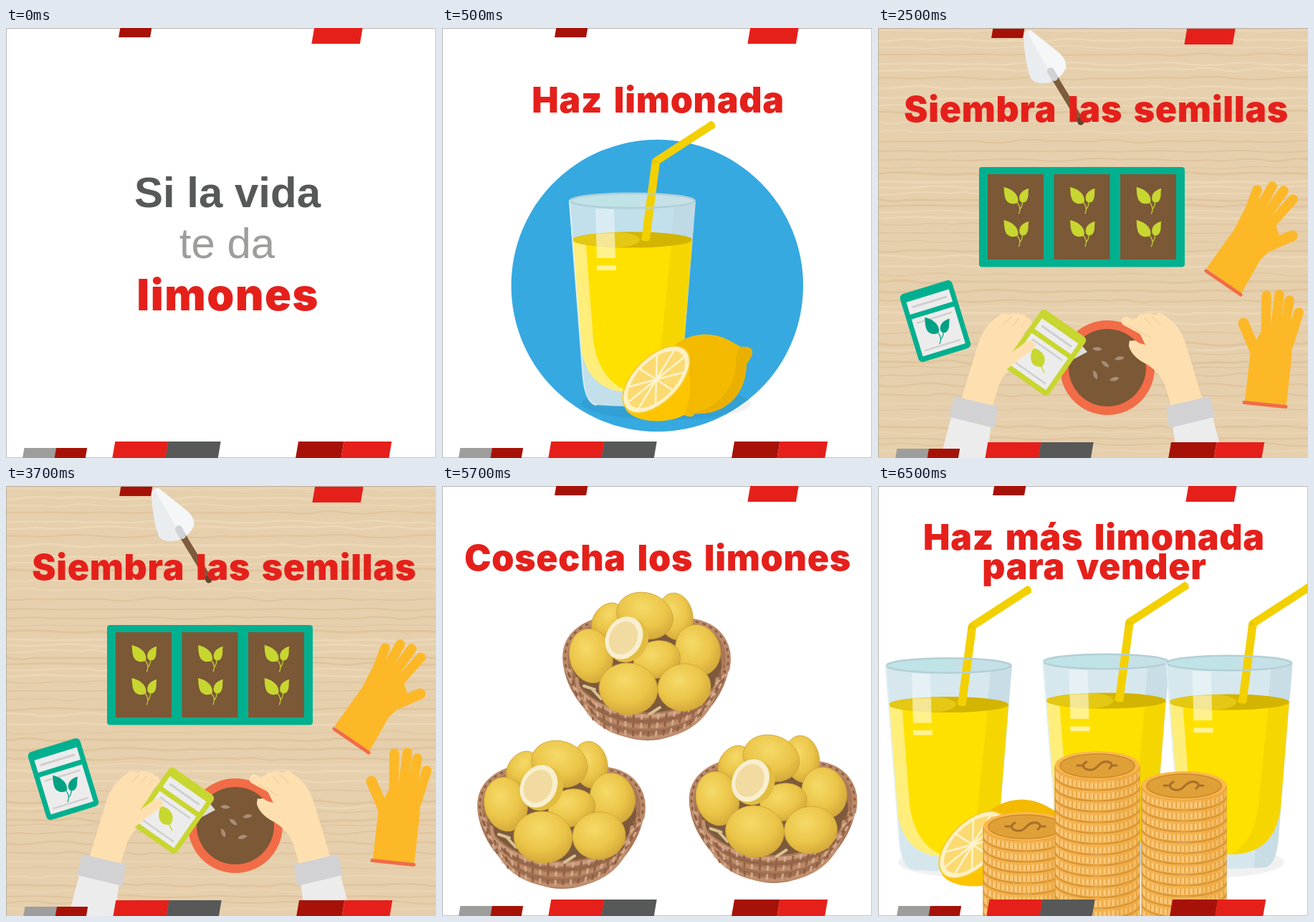
These frames come from a looping animation (600x600 px, 8 s). An HTML page:

```html
<!DOCTYPE html>
<html lang="es">
<head>
<meta charset="utf-8">
<title>Limonada</title>
<style>
html, body { margin: 0; width: 100%; height: 100%; overflow: hidden; background: #fff; }
svg { display: block; width: 100vw; height: 100vh; }
.head { font: 900 50px Inter, "Liberation Sans", sans-serif; letter-spacing: .7px; word-spacing: 5px; fill: #e5201b; text-anchor: middle; }
.intro { font: 60px "Liberation Sans", Arial, sans-serif; text-anchor: middle; }
</style>
</head>
<body>
<svg id="stage" viewBox="0 0 600 600"></svg>
<script>
const RED = '#e5201b', DARK = '#a61208', GREY = '#9d9d9c', SLATE = '#575858';
const SOIL = '#7b5836', LIME = '#c8d630', TEAL = '#00b08f', ORANGE = '#f16c47', SKIN = '#fee0b0', GLOVE = '#fcb827';

const shape = (d, fill, more = '') => `<path d="${d}" fill="${fill}" ${more}/>`;
const line = (d, stroke, w, more = '') =>
  `<path d="${d}" fill="none" stroke="${stroke}" stroke-width="${w}" stroke-linecap="round" stroke-linejoin="round" ${more}/>`;
const oval = (x, y, rx, ry, fill, rot = 0, more = '') =>
  `<ellipse cx="${x}" cy="${y}" rx="${rx}" ry="${ry}" fill="${fill}" transform="rotate(${rot} ${x} ${y})" ${more}/>`;
const box = (x, y, w, h, fill, more = '') =>
  `<rect x="${x}" y="${y}" width="${w}" height="${h}" fill="${fill}" ${more}/>`;
const at = (x, y, s) => `<g transform="translate(${x} ${y})">${s}</g>`;
const turn = (x, y, a, s) => `<g transform="translate(${x} ${y}) rotate(${a})">${s}</g>`;
const head = (x, y, t) => `<text class="head" x="${x}" y="${y}">${t}</text>`;
const use = (id, x, y) => `<use href="#${id}" x="${x}" y="${y}"/>`;

let seed = 7;
const rnd = () => (seed = (seed * 16807) % 2147483647) / 2147483647;

// Slanted bars along the top and bottom edges
const slant = (x, y, w, h, fill) => {
  const s = h * .17;
  return shape(`M${x} ${y}h${w}l${-s} ${h}h${-w}z`, fill);
};
const bars = (dx = 0, dy = 0) => at(dx, dy,
  slant(159.5, -1, 44, 14, DARK) + slant(430.3, -1, 67.5, 23, RED) +
  slant(25.5, 586, 45, 15, GREY) + slant(70, 586, 43.2, 15, DARK) +
  slant(152.3, 577, 74.5, 24, RED) + slant(226.5, 577, 73.2, 24, SLATE) +
  slant(408, 577, 63.5, 24, DARK) + slant(471.5, 577, 66.7, 24, RED));
const edge = '<path d="M.5 600V.5H600" fill="none" stroke="#b4b4b4"/><path d="M599.5 0V599.5H0" fill="none" stroke="#c4c4c4"/>';

function glass() {
  const body = 'M177 241L197 490Q201 523 215 526Q265 530 316 526Q330 523 334 490L354 241';
  const drink = 'M182 295L194 445Q203 508 265 508Q328 508 337 445L349 295A83.5 11 0 0 1 182 295Z';
  return shape(body + 'A88.5 11 0 0 1 177 241Z', '#d2e6ed', 'opacity=".9"') +
    shape('M324 247L354 241L334 490Q330 523 316 526L300 527Z', '#bed6de', 'opacity=".55"') +
    oval(265.5, 241, 87, 10.5, '#c5e0e6') +
    shape('M179 241Q190 231 262 230.500Q278 236 276 244Q272 251 250 251.500Q190 250 179 241Z', '#bfe3e6') +
    shape(drink, '#ffe100') +
    shape('M182 295L194 445Q203 508 262 508Q218 492 211 435L201 303Z', '#ffee7a') +
    shape('M320 303L307 430Q303 490 268 508Q328 508 337 445L349 295Q340 301 320 303Z', '#f6d600') +
    oval(265.5, 295.5, 83.5, 11, '#d3b400') +
    shape('M182 295.500A83.500 11 0 0 1 250 285Q276 288 276 295.500Q274 303 250 306A83.500 11 0 0 1 182 295.500Z', '#e4c814') +
    line('M298.500 186L284.500 292', '#f3d000', 11.5, 'style="stroke-linecap:butt"') +
    shape('M278.700 291L277.500 295Q283 299 289 297L290.300 292Z', '#f3d000') +
    line('M297.800 191L298.500 186L375.500 136', '#f3d000', 11) +
    shape('M371 132L376 129.500Q381 132 381 139L377 142Z', '#f3d000') +
    shape('M292 190L295 182L303 188Z', '#e2bf00', 'opacity=".5"') +
    shape('M214 252L240 253L241 287H215Z', '#fff', 'opacity=".4"') +
    shape('M215 287H241L242 321H216Z', '#fff', 'opacity=".55"') +
    box(216, 331.5, 27, 6.5, '#fff', 'opacity=".6"') +
    oval(265.5, 241, 87, 10.2, 'none', 0, 'stroke="#b3cfd6" stroke-width="2.6"') +
    line('M178 241L197 490Q201 523 215 526', '#e4f0f4', 2, 'opacity=".8"');
}

function lemons() {
  let spokes = '';
  for (let i = 0; i < 10; i++) {
    const a = i * Math.PI / 5 + .2, x = 49 * Math.cos(a), y = 26 * Math.sin(a);
    spokes += line(`M0 0L${x.toFixed(1)} ${y.toFixed(1)}`, '#fff3cc', 2.6);
  }
  return shape('M300 490C303 447 338 427.500 368 427.500C392 428 406 439 417 445Q434 443 433 454Q431 461 425 469C424 512 396 541 350 538Z', '#f4ba00') +
    shape('M417 445Q434 443 433 454Q431 461 425 469C424 512 396 541 350 538C392 526 412 496 410 462Q411 450 417 445Z', '#eab000') +
    shape('M256 532C270 552 314 553 338 540Q349 545 352 539L353 529C361 500 358 464 343 447Z', '#fdc400') +
    shape('M334 451L343 447C358 464 361 500 353 529L352 539Q349 545 338 540C350 510 350 478 334 451Z', '#f4b800') +
    turn(299, 490.5, -45, oval(0, 0, 59, 32.5, '#f8cc2c') + oval(0, 0, 57, 30.5, '#fff1c4') +
      oval(0, 0, 50, 26, '#fbda72') + spokes + oval(0, 0, 5, 3.5, '#fff3cc'));
}

const shadow = oval(313, 524, 118, 22.5, '#000', 0, 'opacity=".055"');

// Sprout with two leaves and a curved stem
const sprout = c => shape('M-18 -19C-8 -17 3 -10 2 1Q0 5 -8 4C-18 1 -17 -10 -18 -19Z', c) +
  shape('M17 -17C10 -16 2 -10 4 -1Q7 5 13 1C18 -5 15 -11 17 -17Z', c) +
  line('M0 2Q7 9 3 18M8 2Q8 8 5 11', c, 1.2);

function wood() {
  let s = box(0, 0, 600, 600, '#e6cfac');
  for (let y = 4; y < 600; y += 7 + rnd() * 9) {
    let x = -20 - rnd() * 100, d = `M${x | 0} ${y | 0}`;
    while (x < 620) {
      const w = 60 + rnd() * 80, k = (rnd() - .5) * 9;
      x += w;
      d += `q${w * .25 | 0} ${k.toFixed(1)} ${w * .5 | 0} 0t${w * .5 | 0} 0`;
    }
    s += line(d, rnd() < .35 ? '#eedbbc' : '#dcc098', (1 + rnd() * 2).toFixed(1), 'opacity=".75"');
  }
  return s;
}

function tray() {
  let s = box(141, 194, 287, 139.5, TEAL, 'rx="4"');
  for (let i = 0; i < 3; i++) {
    const x = 153 + i * 92.5;
    s += box(x, 204, 78, 119, SOIL);
    for (const y of [241, 287]) s += at(x + 40.5, y, sprout(LIME));
  }
  return s;
}

const packet = (c, icon) => box(-38, -49.5, 76, 99, c, 'rx="6"') +
  box(-31, -37, 62, 18, '#ececec') + box(-31, -12, 62, 54, '#ececec') +
  line('M-24 -28H24', '#cfcfcf', 3) + line('M-25 -5H25M-25 35H25', '#cfcfcf', 2.4) + icon;

const glove = (palm, fingers, thumb, cuff) => shape(palm, GLOVE, `stroke="${GLOVE}" stroke-width="4" stroke-linejoin="round"`) +
  line(fingers, GLOVE, 13.5) + line(thumb, GLOVE, 15) + line(cuff, ORANGE, 5);

const arm = shape('M103 540L158 553L152 600H87Z', '#ececec') +
  shape('M117 516L140 440Q148 415 168 402L196 398L212 410L196 442L218 436Q222 452 200 466Q176 478 168 500L159 530Z', SKIN) +
  line('M160 418L176 404M172 420L190 404M184 422L201 406M192 428L208 411', SKIN, 13) +
  line('M175 414L186 403M188 415L197 405M199 418L205 410', '#f3cd98', 1.2) +
  shape('M107 515L166 529L162 557L100 542Z', '#d2d2d4', 'stroke="#d2d2d4" stroke-width="2" stroke-linejoin="round"');

function garden() {
  const trowel = shape('M203 13Q203 2 213 3L253 35Q264 45 262 56Q257 69 240 76Q220 80 213 70Q205 48 203 13Z', '#e9edf0') +
    shape('M207 4L213 3L253 35Q264 45 262 56Q257 66 246 73Z', '#f4f6f7') +
    line('M242 62L283 130', '#7d5b3c', 9) + line('M241 60L246 69', '#cfd3d6', 10) + line('M282 129L283 131', '#5f4630', 9);
  const pot = oval(320, 474, 66, 66, ORANGE) + oval(320, 474, 54, 54, SOIL) +
    [[306, 448, 5], [337, 461, -10], [317, 469, 40], [303, 484, 70], [330, 490, -15]]
      .map(([x, y, a]) => turn(x, y, a, shape('M-7 0Q0 -6 7 0Q0 5 -7 0Z', '#a88d78'))).join('');
  const thumb = line('M176 470L195 455L212 443', SKIN, 14);
  const seedMark = turn(-2, 13, -35, shape('M-8 -16C6 -14 14 0 5 10C-10 12 -14 0 -8 -16Z', LIME) + line('M3 8L8 18', LIME, 1.5));
  return wood() + trowel + tray() +
    turn(80, 409, -17, packet(TEAL, at(-1, 14, `<g transform="rotate(17)">${sprout('#00a184')}</g>`))) +
    glove('M461 335L499 282L511 258L550 266L560 296L532 322L506 368Z',
      'M514 266L529 226M527 262L550 221M537 268L566 227M546 276L579 239', 'M534 309L578 290', 'M458 339L506 372') +
    glove('M514 519L522 450L536 425L577 432L574 470L568 524Z',
      'M541 430L542 373M553 430L560 372M565 432L574 380M573 442L587 397', 'M529 457L510 412', 'M511 522.500L569 528.500') +
    pot + arm + shape('M272 428L292 452L258 470Z', '#dedede') +
    turn(233, 453, 35, packet(LIME, seedMark)) + thumb +
    `<g transform="matrix(-1 0 0 1 569 0)">${arm}${thumb}</g>` +
    line('M346 409L385 430', SKIN, 13) + line('M352 416L380 432', '#f3cd98', 1.2) +
    head(304.5, 131, 'Siembra las semillas');
}

function basket() {
  const rim = 'M173 252C164 205 205 188 230 186M345 188C385 192 405 220 398 255';
  let s = shape('M169 238Q172 190 240 184H335Q396 190 402 235C404 290 350 356 286 355C225 355 166 290 169 238Z', '#a97757') +
    oval(286, 250, 104, 66, '#7d5a3c');
  const tones = ['#c99b7a', '#96664a', '#bd8a68', '#9c6d50', '#c08f6f'];
  tones.forEach((c, i) => {
    const x = 4 * i, y = 245 + 6 * i, low = 321 + 7.5 * i;
    s += line(`M${172 + x} ${y}C${178 + x} ${low - 25} 236 ${low} 286 ${low}S${394 - x} ${low - 25} ${400 - x} ${y}`, c, 5);
  });
  for (let i = 0; i < 30; i++) {
    const a = Math.PI * (.02 + i / 30), c = Math.cos(a), n = Math.sin(a);
    s += line(`M${(286 + 111 * c).toFixed(1)} ${(252 + 68 * n).toFixed(1)}l${(-10 * c - 3).toFixed(1)} ${(8 + 26 * n).toFixed(1)}`,
      i % 2 ? '#d9b497' : '#8a5a40', 3, 'stroke-dasharray="5 7" opacity=".8"');
  }
  s += line(rim, '#bb8a69', 7) + line(rim, '#8f6045', 3, 'stroke-dasharray="2 8"') +
    line('M210 284L222 297M290 318L304 309M198 279L213 284', '#d8c193', 4);
  const fruit = [[231, 188, 20, 27, 35], [326, 182, 24, 33, -10], [283, 181, 40, 32, 18], [208, 237, 30, 38, -12],
    [357, 229, 31, 36, -18], [300, 242, 33, 26, -12], [260, 283, 41, 36, 8], [338, 281, 37, 33, -8]];
  for (const [x, y, w, h, a] of fruit) s += oval(x, y, w, h, 'url(#peel)', a, 'stroke="#cda436" stroke-width=".8"');
  return s + oval(259, 215, 28, 32, '#e3bd40', 32) + oval(254, 212, 25, 31, '#f8efd0', 28) +
    oval(253, 212, 19, 24, '#f2dba0', 28);
}

const PITCH = 15;
function stack(x, y) {
  let s = '';
  for (let k = Math.ceil((620 - y) / PITCH); k >= 0; k--) {
    s += at(x, y + k * PITCH, shape('M-59 0A59 20 0 0 0 59 0V14A59 20 0 0 1 -59 14Z', '#f6b24c', 'stroke="#d39439" stroke-width="1.2"') +
      shape('M-59 4A59 20 0 0 0 59 4V12A59 20 0 0 1 -59 12Z', 'url(#ridge)') +
      shape('M25 18L59 0V14A59 20 0 0 1 25 32Z', '#e0962e', 'opacity=".25"'));
  }
  return s + at(x, y, oval(0, 0, 59, 20, '#fbb74c') + oval(0, .5, 52, 16.5, '#e0a038', 0, 'stroke="#c98a2b" stroke-width="1.6"') +
    line('M17 4C26 -3 13 -9 5 -3C-2 2 -3 7 -12 6C-23 4 -20 -3 -15 -5M-28 0H-20M20 0H27', '#a8712a', 3.2));
}

const defs = `<defs>
<radialGradient id="peel" cx=".42" cy=".34" r=".75"><stop offset="0" stop-color="#f5da68"/><stop offset=".55" stop-color="#ebc548"/><stop offset="1" stop-color="#cda036"/></radialGradient>
<pattern id="ridge" width="6" height="20" patternUnits="userSpaceOnUse">${box(0, 0, 6, 20, '#fbca7c')}${box(0, 0, 2.4, 20, '#e9a949')}</pattern>
<g id="glass">${glass()}</g><g id="lemons">${lemons()}</g><g id="basket">${basket()}</g><g id="shadow">${shadow}</g></defs>`;

const white = box(0, 0, 600, 600, '#fff');
const scenes = [
  { start: 0, art: white + edge + bars() +
    `<text class="intro" x="309" y="250" style="font-weight:700" fill="${SLATE}">Si la vida</text>
    <text class="intro" x="308.5" y="321" fill="${GREY}">te da</text>
    <text class="head" x="309.5" y="394" style="font-size:61px;letter-spacing:1.5px">limones</text>` },
  { start: 500, art: white + edge + oval(300.3, 359.5, 203.7, 203.7, '#36a9e1') +
    use('shadow', 0, 0) + use('glass', 0, 0) + use('lemons', 0, 0) + head(301.5, 117.5, 'Haz limonada') + bars() },
  { start: 2500, art: garden() + bars(1, 1) + '<path d="M.5 600V.5H600" fill="none" stroke="#b8b0a4"/>' },
  { start: 4500, art: white + edge + use('basket', 0, 0) + use('basket', -119, 207) + use('basket', 176.5, 199) +
    head(301, 117.5, 'Cosecha los limones') + bars() },
  { start: 6500, art: white + edge + use('shadow', -167, 1) + use('shadow', 135.5, 1) +
    use('glass', -167, 9.5) + use('glass', 52.5, 4) + use('glass', 224.5, 6) +
    use('lemons', -167, 10) + stack(206, 475) + stack(427, 418) + stack(306, 390) +
    head(301.5, 89, 'Haz más limonada') + head(302, 130, 'para vender') + bars(3, 0) }
];

const stage = document.getElementById('stage');
stage.innerHTML = defs + scenes.map(s => `<g class="scene" display="none">${s.art}</g>`).join('');
const layers = [...stage.querySelectorAll('.scene')];
const LOOP = 8000, t0 = performance.now();
let shown = -1;

function tick() {
  const t = (performance.now() - t0) % LOOP;
  const now = scenes.findLastIndex(s => t >= s.start);
  if (now !== shown) {
    layers.forEach((g, i) => g.setAttribute('display', i === now ? 'inline' : 'none'));
    shown = now;
  }
  requestAnimationFrame(tick);
}
tick();
</script>
</body>
</html>
```
